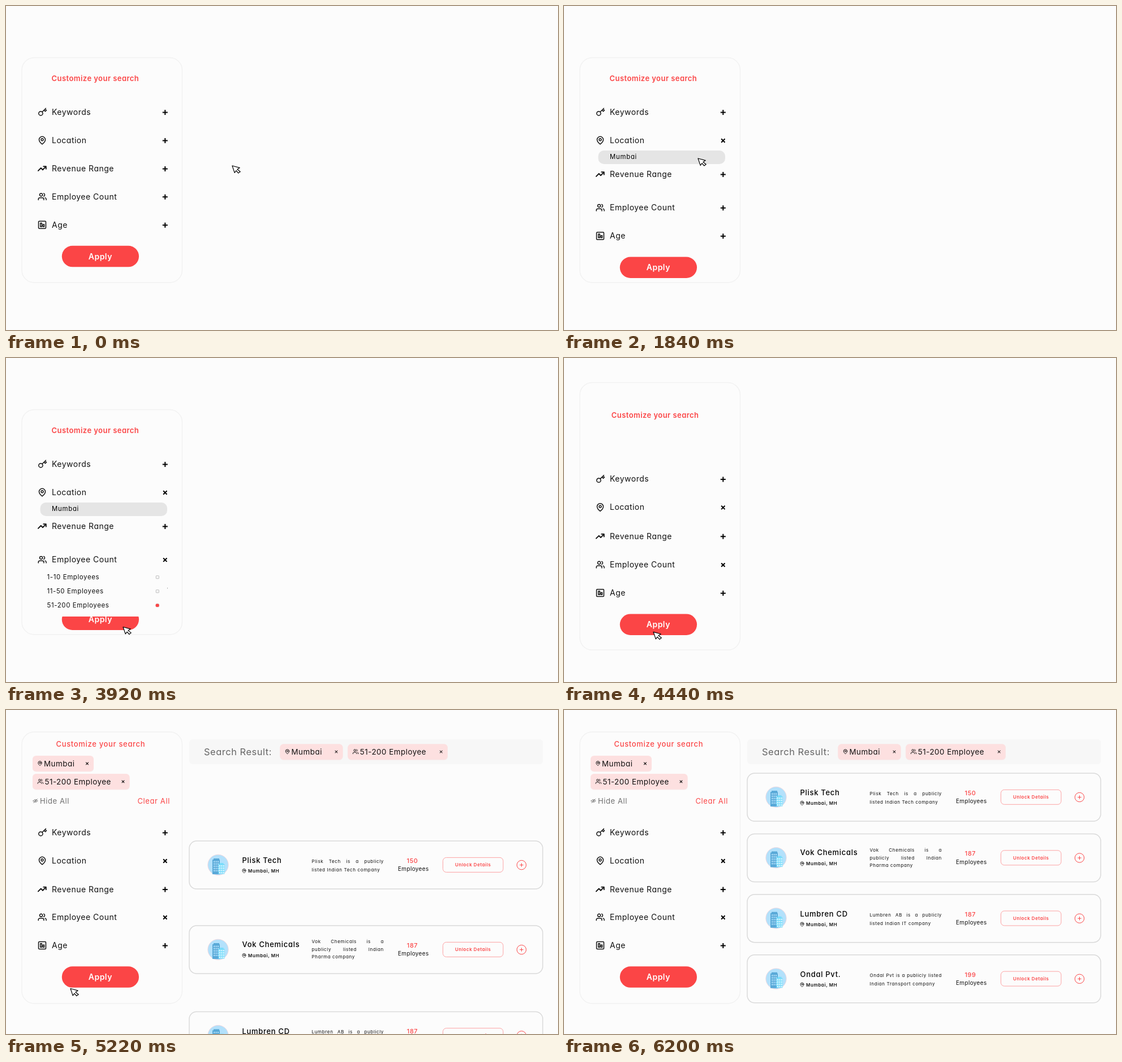
These frames come from a looping animation (976 by 574 pixels, 6500 ms). An HTML page:

```html
<!DOCTYPE html>
<html lang="en">
<head>
<meta charset="utf-8">
<title>Customize your search</title>
<style>
  html, body { margin: 0; width: 100%; height: 100%; overflow: hidden; background: #fcfcfc; }
  svg { display: block; width: 976px; height: 574px; }
  svg, .about { font-family: Inter, "Open Sans", sans-serif; font-feature-settings: "cv11"; }
  .about { font-size: 8.1px; letter-spacing: .6px; color: #111; white-space: nowrap; }
  .about div { text-align-last: justify; }
  .about div:last-child { text-align-last: left; }
  .icon { fill: none; stroke: #111; stroke-linecap: round; stroke-linejoin: round; }
</style>
</head>
<body>
<svg id="stage" viewBox="0 0 976 574"></svg>
<script>
const LOOP = 6500, RED = "#fb4546", INK = "#111", PAPER = "#fcfcfc";

const ICONS = {
  key: `<circle cx="8" cy="15.5" r="5.6"/><path d="M12 11.5L22 1.5M17 6.5l3.5 3.5 3-3-3.5-3.5"/>`,
  pin: `<path d="M20.5 10.2c0 6.3-8.5 12.4-8.5 12.4s-8.5-6.1-8.5-12.4a8.5 8.5 0 0 1 17 0z"/><circle cx="12" cy="10" r="3"/>`,
  trend: `<path d="M1 18l7.5-7.5 5 5L22 6.5M15.5 6H22.5v7"/>`,
  people: `<circle cx="9" cy="7" r="4"/><path d="M1.5 21v-2a4 4 0 0 1 4-4h7a4 4 0 0 1 4 4v2M23 21v-2a4 4 0 0 0-3-3.87M16 3.13a4 4 0 0 1 0 7.75"/>`,
  chart: `<rect x="2" y="2" width="20" height="20" rx="2"/><path d="M7 7h4v10H7zM14 11h3.5v6H14z"/>`,
  eye: `<path d="M1 12q11-13 22 0q-11 13-22 0M3 21L21 3"/><circle cx="12" cy="12" r="3"/>`
};

function icon(name, x, y, size, weight = 1.5, color = INK) {
  const k = size / 24;
  return `<g class="icon" style="stroke:${color}" stroke-width="${weight / k}"
    transform="translate(${x - size / 2} ${y - size / 2}) scale(${k})">${ICONS[name]}</g>`;
}

// y is the middle of the capital letters
function text(str, x, y, size, { weight = 400, color = INK, gap = .5, anchor = "start", id = "" } = {}) {
  return `<text id="${id}" x="${x}" y="${y + size * .36}" font-size="${size}" font-weight="${weight}"
    fill="${color}" letter-spacing="${gap}" text-anchor="${anchor}">${str}</text>`;
}

function rect(x, y, w, h, r, attrs) {
  return `<rect x="${x}" y="${y}" width="${w}" height="${h}" rx="${r}" ${attrs}/>`;
}

function plus(x, y, arm, weight, color = "#000") {
  return `<path d="M${x - arm} ${y}h${2 * arm}M${x} ${y - arm}v${2 * arm}" stroke="${color}" stroke-width="${weight}"/>`;
}

function cross(x, y, arm, weight) {
  return `<g transform="rotate(45 ${x} ${y})">${plus(x, y, arm, weight)}</g>`;
}

function chip(x, y, w, iconName, label) {
  const wide = iconName === "people" ? 1.5 : 0;
  return rect(x, y + 1, w, 27.5, 6, `fill="#f7d9d9" opacity=".5"`) +
    rect(x, y, w, 27.5, 6, `fill="#fde0e0"`) +
    icon(iconName, x + 13 + wide / 2, y + 13.5, 9 + wide, 1) +
    text(label, x + 20 + wide, y + 13.7, 13.4) + cross(x + w - 11.5, y + 13.8, 3.2, 1);
}

const rows = [
  { label: "Keywords", icon: "key", y: [188, 188, 217] },
  { label: "Location", icon: "pin", y: [238, 238, 267], opens: 600 },
  { label: "Revenue Range", icon: "trend", y: [288, 298, 317.5] },
  { label: "Employee Count", icon: "people", y: [337.7, 357.2, 367], opens: 2400 },
  { label: "Age", icon: "chart", y: [387.7, 407.3, 417] }
];

const companies = [
  { name: "Plisk Tech", count: 150, y: 112, about: ["Plisk Tech is a publicly", "listed Indian Tech company"] },
  { name: "Vok Chemicals", count: 187, y: 219.5, about: ["Vok Chemicals is a", "publicly listed Indian", "Pharma company"] },
  { name: "Lumbren CD", count: 187, y: 326.7, about: ["Lumbren AB is a publicly", "listed Indian IT company"] },
  { name: "Ondal Pvt.", count: 199, y: 433.8, about: ["Ondal Pvt is a publicly listed", "Indian Transport company"] }
];

function windows(x, y, cols, lines, color) {
  let d = "";
  for (let r = 0; r < lines; r++)
    for (let c = 0; c < cols; c++) d += `M${x + c * 3.4} ${y + r * 4}h2v2.4h-2z`;
  return `<path d="${d}" fill="${color}"/>`;
}

function building() {
  return `<circle cx="375" cy="42.3" r="18.2" fill="#b3e1fb" stroke="#f6d5da" stroke-width=".8"/>
    <path d="M365 33h2v-2h10v2h1v26h-13z" fill="#59a9d8"/>` + windows(367.2, 35.5, 3, 5, "#b3e1fb") +
    `<path d="M375.5 41h2v-2h7v2h2v17.5h-11z" fill="#7bdcfa"/>` + windows(377, 43, 3, 4, "#e4f8ff");
}

function card({ name, count, about }, i) {
  const three = about.length === 3;
  return `<g id="card${i}">` +
    rect(324, 0, 625, 85, 13, `fill="${PAPER}" stroke="#dadada" stroke-width="1.5"`) + building() +
    text(name, 417.5, three ? 33 : 34.5, 13, { weight: 500, gap: .7, color: "#000" }) +
    icon("pin", 421, 53, 8.5, .9) + text("Mumbai, MH", 428, 53, 8, { weight: 600, gap: .6 }) +
    `<foreignObject x="540.5" y="${three ? 22 : 28.5}" width="127.5" height="50">
      <div xmlns="http://www.w3.org/1999/xhtml" class="about" style="line-height:${three ? 13.5 : 15}px">
      ${about.map(line => `<div>${line}</div>`).join("")}</div></foreignObject>` +
    text(count, 718.5, 35, 11, { weight: 500, color: RED, anchor: "middle" }) +
    text("Employees", 720.3, 49.7, 10, { gap: .35, anchor: "middle" }) +
    rect(772.5, 29.3, 106.5, 26, 6, `fill="none" stroke="#fca3a4"`) +
    text("Unlock Details", 825.8, 42.2, 8, { weight: 600, color: RED, gap: .55, anchor: "middle" }) +
    `<circle cx="911.5" cy="42.5" r="8.2" fill="none" stroke="${RED}"/>` + plus(911.5, 42.5, 3.2, 1, RED) + `</g>`;
}

function option(label, y, picked) {
  return text(label, 72.5, y, 11.5, { gap: .6 }) +
    rect(265.3, y - 2.2, 5, 5, .5, `fill="none" stroke="#bbb"`) +
    (picked ? rect(264.5, y - 2.5, 6.2, 5.6, 2.4, `id="picked" fill="${RED}"`) : "");
}

document.getElementById("stage").innerHTML =
  `<clipPath id="listClip">${rect(50, 372, 240, 0, 0, `id="listMask"`)}</clipPath>` +
  rect(28, 0, 283.5, 0, 22, `id="panel" fill="${PAPER}" stroke="#f2f2f2" stroke-width="1.5"`) +
  `<g id="chips">${chip(47, 81, 108, "pin", "Mumbai")}${chip(47, 113, 171.5, "people", "51-200 Employee")}</g>` +
  text("Customize your search", 0, 0, 13, { weight: 600, color: RED, id: "title" }) +
  `<g id="links">${icon("eye", 52, 161, 9, .9, "#777")}${text("Hide All", 60, 161, 13, { color: "#707070", gap: .6 })}
    ${text("Clear All", 232.5, 161, 13, { color: RED, gap: .6 })}</g>` +
  `<g id="place">${rect(60.5, 256, 224.5, 24, 10, `fill="#e5e5e5"`)}
    ${text("", 81, 267, 11.3, { gap: .8, id: "typed", color: "#000" })}</g>` +
  rows.map((row, i) => `<g id="row${i}">${icon(row.icon, 64, 0, 15.5, row.icon === "trend" ? 1.9 : 1.5)}
    ${text(row.label, 81, 0, 14)}<g id="mark${i}">${plus(0, 0, 4.5, 2)}</g></g>`).join("") +
  `<g id="apply">${rect(98.8, -18.7, 136.2, 37.5, 18.7, `fill="${RED}"`)}
    ${text("Apply", 166.8, 0, 14, { weight: 600, color: "#fff", anchor: "middle" })}</g>` +
  `<g id="list" clip-path="url(#listClip)">${rect(50, 372, 235.6, 86, 0, `fill="${PAPER}"`)}
    ${option("1-10 Employees", 388)}${option("11-50 Employees", 413)}${option("51-200 Employees", 438, true)}</g>` +
  `<g id="header">${rect(324, 52, 625.5, 44, 6, `fill="#f7f7f7"`)}
    ${text("Search Result:", 350, 74.3, 16.5, { color: "#666" })}
    ${chip(484.5, 60.2, 111, "pin", "Mumbai")}${chip(604.3, 60.2, 176.5, "people", "51-200 Employee")}</g>` +
  companies.map(card).join("") +
  `<path id="cursor" d="M0 0L13.2 3.6 8.9 6.4 14.2 10.4 10.8 13 7 8.6 4.2 12.4z" fill="#fff"
    stroke="#000" stroke-width="1.2" stroke-linejoin="round"/>`;

const el = {};
document.querySelectorAll("#stage [id]").forEach(node => { if (node.id) el[node.id] = node; });

// start, end, x, y
const moves = [
  [10, 640, 281, 243], [740, 1360, 237, 270], [1980, 2480, 281.5, 364],
  [2600, 3290, 247, 450], [3290, 3930, 207, 476.5], [3940, 4910, 114, 493.5]
];

const ramp = (t, a, b) => Math.min(1, Math.max(0, (t - a) / (b - a)));
const ease = (t, a, b) => (1 - Math.cos(Math.PI * ramp(t, a, b))) / 2;
const mix = (a, b, k) => a + (b - a) * k;
const set = (id, attrs) => { for (const k in attrs) el[id].setAttribute(k, attrs[k]); };
const place = (id, x, y) => set(id, { transform: `translate(${x} ${y})` });

function draw(t) {
  const open = ease(t, 640, 1240), shift = ease(t, 3940, 4560);
  const slide = ([a, b, c]) => mix(mix(a, b, open), c, shift);
  const leave = 1 - ramp(t, 3950, 4150);

  set("panel", { y: mix(91.5, 38.8, shift), height: mix(398.5, 481.2, shift) });

  const rise = ease(t, 4180, 4780), late = rise > .5;
  place("title", mix(80.5, 88.5, rise), mix(128.5, 60, rise));
  set("title", { "font-weight": late ? 500 : 600, "letter-spacing": late ? .67 : .45 });
  set("chips", { opacity: ramp(t, 4500, 4640) });
  set("links", { opacity: ramp(t, 4600, 4760) });

  rows.forEach((row, i) => {
    place("row" + i, 0, slide(row.y));
    const turn = row.opens ? 45 * ease(t, row.opens, row.opens + 200) : 0;
    set("mark" + i, { transform: `translate(281.3 .5) rotate(${turn})` });
  });
  place("apply", 0, slide([443.5, 463.2, 473]));

  set("place", { opacity: ramp(t, 760, 1200) * leave });
  el.typed.textContent = "Mumbai".slice(0, Math.max(0, Math.floor((t - 1360) / 80)));

  set("listMask", { height: 86 * ease(t, 2400, 2620) });
  set("list", { opacity: leave });
  set("picked", { opacity: t >= 3240 ? 1 : 0 });

  place("header", 0, -96 * (1 - ease(t, 4500, 5100)));
  companies.forEach((c, i) => {
    const start = 4640 + 57 * i;
    place("card" + i, 0, c.y + (t < start ? 574 : 455 * (1 - ease(t, start, start + 885))));
  });

  let x = 400, y = 283;
  for (const [from, to, nx, ny] of moves) {
    const k = ease(t, from, to);
    x = mix(x, nx, k);
    y = mix(y, ny, k);
  }
  place("cursor", x, y);
  set("cursor", { opacity: t < 6200 ? 1 : 0 });
}

function frame() {
  draw(performance.now() % LOOP);
  requestAnimationFrame(frame);
}
frame();
</script>
</body>
</html>
```
